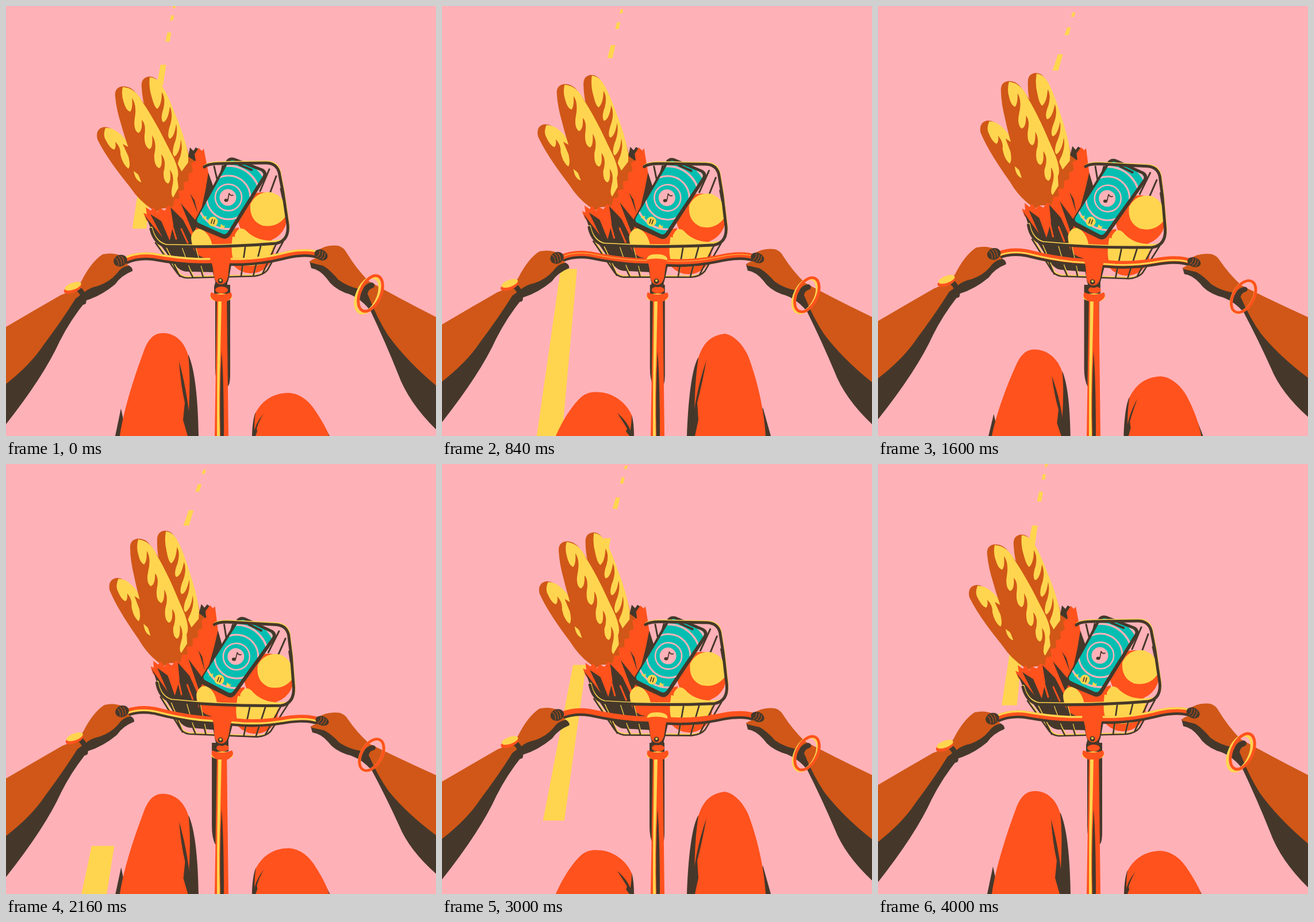
Write an HTML page that moves like this. It is 748 px wide and 748 px high and loops after 4.04 s.

```html
<!DOCTYPE html>
<html>
<head>
<meta charset="utf-8">
<style>
  html, body { margin: 0; width: 100%; height: 100%; overflow: hidden; background: #ffb1b8 }
  svg { display: block; width: 100vw; height: 100vh }
  .p { fill: #ffb1b8 } .b { fill: #d05717 } .y { fill: #ffd54f }
  .r { fill: #ff521d } .d { fill: #45382b } .t { fill: #04bfb1 }
  .l { fill: none; stroke-linecap: round; stroke-linejoin: round }
  .sd { stroke: #45382b } .sy { stroke: #ffd54f } .sr { stroke: #ff521d } .sp { stroke: #ffb1b8 }
</style>
</head>
<body>
<svg viewBox="0 0 748 748">
  <defs>
    <path id="rim" d="M345 280Q352 274 375 274L452 273Q470 273 475 289L482 325L490 380Q493 408 470 413Q370 421 278 418Q258 413 252 388"/>
    <path id="wires" d="M260 412L296 462Q302 472 314 473L432 470Q448 468 455 459L482 410M276 419L302 470M304 420L318 458L325 472M328 420L343 472M416 420L409 470M443 418L430 470M470 414L446 466"/>
    <path id="bar" d="M207 441Q228 431 256 434Q300 442 335 443L410 443Q445 442 478 434Q520 423 543 431"/>
    <path id="screen" d="M397 269Q391 267 387 272L333 369Q330 375 336 378L376 396Q382 399 386 393L446 297Q450 290 443 287Z"/>
    <clipPath id="clip"><use href="#screen"/></clipPath>
  </defs>
  <rect class="p" width="748" height="748"/>
  <path id="road" class="y"/>

  <g id="basket">
    <!-- basket, back part -->
    <path class="l sd" stroke-width="3" d="M362 279L371 318M377 278L372 300M458 284L442 322M470 296L459 326M478 318L484 345"/>
    <path class="d" d="M246 372L256 398L288 442Q300 462 315 462L360 463L366 420L330 395Z"/>

    <!-- bread -->
    <path class="b" d="M236 142Q234 126 247 123Q260 121 268 136Q290 175 302 210Q312 238 319 262L333 266L310 330L300 310Q262 220 245 185Q237 165 236 142Z"/>
    <path class="y" d="M250 124Q248 142 254 160Q258 176 263 179Q271 172 271 150Q278 160 274 178Q268 196 273 202Q282 200 285 175Q292 190 284 212Q280 228 285 231Q293 228 296 205Q300 222 292 242Q288 258 293 262Q303 255 304 232Q309 250 300 270Q295 284 301 294L317 272L317 258Q310 225 295 190Q280 150 268 134Q260 124 250 124Z"/>
    <path class="b" d="M159 232Q155 215 168 211Q180 208 195 222L220 250L290 340L262 358Q235 344 215 314Q175 265 159 232Z"/>
    <path class="y" d="M173 212Q168 225 174 234Q181 248 188 250Q192 246 190 236Q200 246 199 258Q203 276 213 283Q217 278 213 262L203 240L214 246Q210 230 194 219Q184 211 173 212ZM222 287Q236 296 237 307Q225 305 222 287ZM244 318Q251 321 250 326Q245 325 244 318Z"/>
    <path class="b" d="M190 158Q188 143 201 140Q215 138 225 150Q248 178 265 210L314 304L296 350L255 354Q215 260 200 205Q192 180 190 158Z"/>
    <path class="y" d="M203 141Q200 155 205 168Q209 182 216 184Q221 178 219 160Q228 172 224 195Q221 215 230 221Q238 218 236 198Q244 205 241 225Q240 245 250 249Q256 246 254 225Q263 238 258 258Q257 278 266 282Q273 280 270 258Q280 268 274 290Q274 306 282 309Q288 305 285 285Q294 296 289 315Q286 330 291 333L300 316L298 300Q303 290 292 265L268 218Q250 185 238 168Q225 142 203 141Z"/>

    <!-- paper bag -->
    <path class="d" d="M317 262L320 246L326 252L330 246L337 250L332 272Z"/>
    <path class="r" d="M335 247L341 252L344 248L352 290L366 330L345 385L330 410L300 425L285 418L262 390L244 372L239 360L245 362L243 350L252 356L256 350L263 359L268 352L276 356L282 347L290 350L293 336L302 335L300 322L310 320L309 307L318 304L317 292L325 288L322 274L330 269L328 258Z"/>
    <path class="d" d="M251 362L276 410L290 420L270 374ZM241 364L270 400L288 424L262 402ZM286 350L291 380L282 420L300 440L330 440L327 408L308 372ZM304 343L326 396L334 378ZM320 326L334 362L328 338ZM352 290L362 318L350 345L338 362L347 320Z"/>
    <path class="l sr" stroke-width="3" d="M284 365L296 405M305 388L316 412"/>

    <!-- fruit -->
    <circle class="r" cx="352" cy="410" r="29"/>
    <path class="r" d="M350 400L405 385L400 440H350Z"/>
    <path class="y" d="M322 402Q326 386 340 388Q356 398 359 418H326Q322 412 322 402Z"/>
    <circle class="r" cx="426" cy="425" r="40"/>
    <path class="y" d="M394 401Q390 430 397 446Q420 456 446 449Q462 436 466 416Z"/>
    <circle class="r" cx="446" cy="367" r="43"/>
    <path class="y" d="M425 345Q436 322 461 324Q486 330 489 362Q474 387 446 382Q423 373 425 345ZM398 398Q407 378 421 394Q443 413 477 406L470 416H399Z"/>

    <!-- phone -->
    <path class="d" d="M397 264Q388 262 383 269L328 374Q325 382 333 386L376 404Q384 407 390 399L451 300Q457 289 447 283Z"/>
    <use href="#screen" class="t"/>
    <g clip-path="url(#clip)" class="l sp">
      <circle cx="387" cy="333" r="23" stroke-width="2.5"/>
      <circle cx="387" cy="333" r="38" stroke-width="3"/>
      <circle cx="387" cy="333" r="55" stroke-width="3.5"/>
      <circle cx="387" cy="333" r="71" stroke-width="4"/>
    </g>
    <circle class="p" cx="386" cy="333" r="14.5"/>
    <ellipse class="d" cx="383" cy="338" rx="3.5" ry="2.8"/>
    <path class="l sd" stroke-width="1.7" d="M386 337L388 326Q391 331 395 329"/>
    <path class="l sd" stroke-width="4" d="M405 276L427 285"/>
    <circle class="y" cx="360" cy="375" r="8.5"/>
    <path class="l sd" stroke-width="1.7" d="M359 371L357 378M363 372L361 379"/>
    <path class="y" d="M349 365L347 373L343 368L341 371L343 364L345 367ZM374 379L379 383L381 380L379 388L377 385L372 387Z"/>

    <!-- basket, front part -->
    <g class="l">
      <g class="sy" transform="translate(1 -2)"><use href="#rim" stroke-width="4"/><use href="#wires" stroke-width="2"/></g>
      <g class="sd"><use href="#rim" stroke-width="5"/><use href="#wires" stroke-width="2.7"/></g>
    </g>
  </g>

  <!-- steering tube -->
  <path id="shade" class="d" d="M364 485H390V640Q390 662 384 662H370Q364 650 364 630Z"/>
  <path class="r" d="M367 505H384L387 748H363Z"/>
  <path class="y" d="M369 510H375L373 600Q370 680 372 748H367Q367 650 368 600Z"/>
  <path class="d" d="M375 600Q379 650 379 748H373Q371 680 375 600Z"/>

  <g id="stem">
    <path class="d" d="M365 478H385V500H362V488Z"/>
    <ellipse class="r" cx="375" cy="494" rx="11" ry="6"/>
    <ellipse class="y" cx="374" cy="507" rx="19" ry="7"/>
    <path class="r" d="M357 498Q374 506 391 498Q396 505 388 511L384 514H366Q352 508 357 498Z"/>
  </g>

  <g id="handlebar">
    <g class="l">
      <use href="#bar" class="sd" stroke-width="10" y="4"/>
      <use href="#bar" class="sr" stroke-width="9"/>
      <use id="gleam" href="#bar" class="sy"/>
    </g>
    <path class="d" d="M357 452L363 476Q366 489 377 488Q386 486 388 472L392 450Z"/>
    <path class="r" d="M355 441Q356 431 373 431Q391 431 391 441Q388 449 387 463Q386 484 374 484Q363 484 361 465Q360 450 355 441Z"/>
    <path id="cap" class="y" d="M355 441Q356 431 373 431Q391 431 391 441Q374 436 355 441Z"/>
    <circle class="d" cx="373" cy="478" r="4.5"/>
    <circle class="y" cx="373" cy="477" r="2"/>
  </g>

  <path id="leftDark" class="d"/><path id="left" class="r"/><path id="leftFold" class="d"/>
  <path id="rightDark" class="d"/><path id="right" class="r"/><path id="rightFold" class="d"/>

  <g id="leftArm">
    <path class="d" d="M-10 640L60 560L125 488L188 452L213 451Q221 455 220 461Q200 469 190 484Q166 504 140 512Q112 546 93 584Q64 648 -10 740Z"/>
    <path class="b" d="M-10 564L50 529L95 503Q118 495 131 479Q148 445 168 432Q185 428 199 434L213 452Q201 453 192 466Q180 480 160 487Q145 490 136 498L121 509Q98 546 65 590Q40 628 -10 665Z"/>
    <g transform="rotate(-20 199 443)">
      <ellipse class="d" cx="199" cy="443" rx="12" ry="10"/>
      <path class="l" stroke="#d05717" d="M193 436Q197 443 193 450M198 435Q202 443 198 451M203 436Q206 443 203 450"/>
    </g>
    <path class="l sd" stroke-width="9" d="M124 491Q136 498 135 515"/>
    <g transform="rotate(-20 115 489)">
      <ellipse class="r" cx="115" cy="492" rx="16" ry="7"/>
      <ellipse class="y" cx="117" cy="488" rx="15" ry="6"/>
    </g>
  </g>

  <g id="rightArm">
    <path class="d" d="M528 444L552 440L625 485L760 600V748Q702 695 682 640Q660 585 634 530Q614 505 590 499Q568 490 558 474Q545 458 531 456Z"/>
    <path class="b" d="M538 428Q555 414 578 417Q588 420 593 430Q608 455 630 478Q690 512 760 547V670Q700 622 664 572Q645 542 630 503L614 492Q594 488 578 476Q565 460 552 452L528 446Q531 440 540 439Z"/>
    <g transform="rotate(25 548 433)">
      <ellipse class="d" cx="548" cy="433" rx="12" ry="9"/>
      <path class="l" stroke="#d05717" d="M543 427Q547 433 543 439M548 426Q552 433 548 440M553 427Q556 433 553 439"/>
    </g>
    <path class="l sd" stroke-width="10" d="M636 486Q622 490 624 508"/>
    <g class="l" stroke-width="5">
      <ellipse id="bangle" class="sy" cx="634" cy="500" rx="18" ry="33"/>
      <ellipse class="sr" cx="634" cy="500" rx="18" ry="33" transform="rotate(24 634 500)"/>
    </g>
  </g>
</svg>
<script>
const $ = id => document.getElementById(id);
const set = (id, name, value) => $(id).setAttribute(name, value);
const move = (id, value) => set(id, 'transform', value);

// Knee outlines: raised pose, lowered pose
const knees = {
  left: [
    'M198 748C205 700 225 640 238 605C248 575 260 568 276 569C300 571 312 590 317 608C322 650 318 700 316 748Z',
    'M198 748C212 715 232 688 245 678C256 671 265 671 276 672C300 674 322 692 330 712C330 725 328 735 326 748Z'],
  leftDark: [
    'M190 748L200 700L210 748ZM317 606C328 630 334 680 335 748L300 748Z',
    'M198 748L205 735L210 748ZM330 711C333 722 334 735 334 748L310 748Z'],
  leftFold: [
    'M301 618Q304 660 311 690L308 720L316 748L322 748Q318 680 301 618Z',
    'M305 708Q314 722 322 735L320 740L326 748L330 748Q328 728 305 708Z'],
  right: [
    'M440 748C438 700 440 650 446 612C455 583 470 573 492 570C510 573 525 592 533 610C548 650 560 700 563 748Z',
    'M432 748C432 735 432 720 434 708C448 682 470 673 492 673C512 674 528 688 538 704C550 722 558 736 562 748Z'],
  rightDark: [
    'M446 611C434 630 428 690 426 748L460 748ZM558 698L572 748L550 748Z',
    'M434 707C430 716 428 735 428 748L450 748ZM556 735L563 748L550 748Z'],
  rightFold: [
    'M460 616Q452 660 444 690L446 720L440 748L434 748Q438 680 460 616Z',
    'M448 709Q440 722 436 735L437 740L434 748L430 748Q432 728 448 709Z']
};

function mix([a, b], k) {
  const to = b.match(/\d+/g);
  let i = 0;
  return a.replace(/\d+/g, v => (+v + (to[i++] - v) * k).toFixed(2));
}

// Dashes are evenly spaced in depth; depth is 1 / (y + 80)
function road(t, sway) {
  const gap = .00245, length = .0009;
  const phase = (.759 + 7.057 * t / 4000 - .13 * sway ** 6) % 1;
  const toY = depth => depth < .00114 ? 800 : 1 / depth - 80;
  const edge = (y, side) => {
    const x = 293 + 57 * sway - (.2 + .147 * sway) * y + .00011 * y * y;
    return `${x + side * (y + 80) * .0265} ${y}`;
  };
  let d = '';
  for (let n = 1; n < 7; n++) {
    const far = gap * (n - phase), top = toY(far), end = toY(far - length);
    d += `M${edge(top, -1)}L${edge(top, 1)}L${edge(end, 1)}L${edge(end, -1)}Z`;
  }
  return d;
}

function draw(t) {
  const turn = 2 * Math.PI * t / 4000;
  const sway = (1 - Math.cos(turn)) / 2, side = 1 - 2 * sway;
  const pedal = Math.max(-1, Math.min(1, 1.1 * Math.cos(2 * turn + .1)));
  const drop = (1 - pedal) / 2;

  set('road', 'd', road(t, sway));
  for (const id in knees) set(id, 'd', mix(knees[id], id.startsWith('left') ? drop : 1 - drop));

  move('basket', `rotate(${3.9 * sway} 365 540)`);
  move('handlebar', `rotate(${4.4 * sway} 345 480)`);
  move('stem', `translate(${2 * sway})`);
  move('shade', `translate(${-6 * sway})`);
  move('leftArm', `translate(${3 * sway} ${-13 * sway})`);
  // The right forearm foreshortens as the hand comes closer
  move('rightArm', `translate(${2 * sway} ${66 * sway}) scale(1 ${1 - .12 * sway})`);
  move('bangle', `translate(${-5 * (1 - sway)} ${3 * (1 - sway)}) rotate(24 634 500)`);

  set('gleam', 'y', -3 * side);
  set('gleam', 'stroke-width', 3.5 * Math.abs(side));
  set('cap', 'opacity', Math.abs(side) < .5 ? 1 : 0);
}

const start = performance.now();
function frame() {
  const t = (performance.now() - start) % 4040;
  draw(Math.floor(t / 40) * 40);
  requestAnimationFrame(frame);
}
frame();
</script>
</body>
</html>
```
